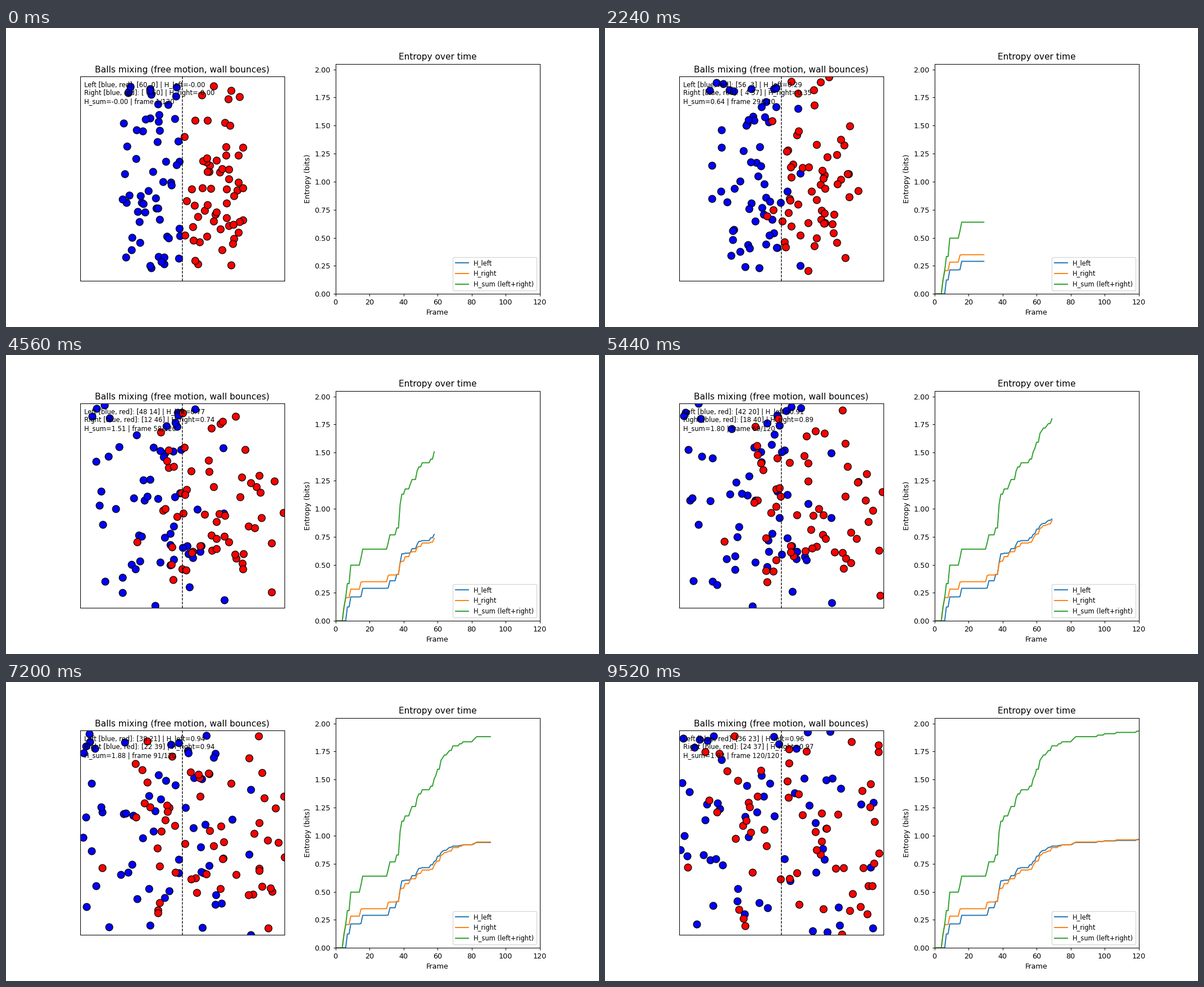
Write a matplotlib script that moves like this. It is 1054 px wide and 531 px high and loops after 9.6 s.

```python
import numpy as np
import matplotlib.pyplot as plt
from matplotlib.animation import FuncAnimation

plt.rcParams["font.family"] = "DejaVu Sans"

FRAMES, INTERVAL, DPI = 120, 80, 92
BALLS = 60
LEFT, RIGHT, TOP, BOTTOM = 132, 495, 87, 450
MID = (LEFT + RIGHT) / 2

# Frame numbers at which one more ball of the colour passes the middle.
BLUE_CROSS = [5, 6, 9, 15, 31, 38, 38, 41, 44, 48, 51, 58, 59, 62, 62, 64,
              69, 69, 73, 75, 81, 83, 100, 107]
RED_CROSS = [7, 9, 16, 32, 36, 38, 38, 39, 39, 45, 48, 49, 56, 58, 60, 60,
             62, 63, 66, 67, 82, 96, 119]

rng = np.random.default_rng(7)


def launch(crossings, toward):
    """Random starts and velocities; some balls pass the middle on schedule."""
    time = np.array(crossings) - 1.5
    crossing = slice(len(time))
    gap = rng.uniform(4, 108, BALLS)
    gap[crossing] = np.minimum(108, 1.9 * time) * rng.uniform(0.3, 1, len(time))
    speed = rng.uniform(-1.7, gap / 125)
    speed[crossing] = gap[crossing] / time
    start = np.column_stack([MID - toward * gap, rng.uniform(98, 436, BALLS)])
    vy = np.clip(rng.normal(0, 0.9, BALLS), -1.9, 1.9)
    return start, np.column_stack([toward * speed, vy])


def bounce(value, low, high):
    span = high - low
    return low + span - np.abs((value - low) % (2 * span) - span)


def positions(start, velocity, step):
    x, y = (start + velocity * step).T
    return np.column_stack([bounce(x, LEFT, RIGHT), bounce(y, TOP, BOTTOM)])


def entropy(counts):
    p = counts / counts.sum()
    p = p[p > 0]
    return -np.sum(p * np.log2(p))


numbers = np.arange(1, FRAMES + 1)
blue_over = np.searchsorted(BLUE_CROSS, numbers, side="right")
red_over = np.searchsorted(RED_CROSS, numbers, side="right")
left_counts = np.column_stack([BALLS - blue_over, red_over])
right_counts = np.column_stack([blue_over, BALLS - red_over])
h_left = np.array([entropy(c) for c in left_counts])
h_right = np.array([entropy(c) for c in right_counts])
h_sum = h_left + h_right

fig, (box, graph) = plt.subplots(1, 2, figsize=(11.457, 5.772), dpi=DPI)
fig.subplots_adjust(left=0.125, right=0.9, bottom=0.1108, top=0.88, wspace=0.25)

box.set(xlim=(LEFT, RIGHT), ylim=(BOTTOM, TOP), xticks=[], yticks=[],
        aspect="equal", title="Balls mixing (free motion, wall bounces)")
box.axvline(MID, color="black", linestyle="--", linewidth=1)
info = box.text(0.02, 0.98, "", transform=box.transAxes, va="top", fontsize=9)

balls = []
for crossings, toward, color in [(BLUE_CROSS, 1, "blue"), (RED_CROSS, -1, "red")]:
    start, velocity = launch(crossings, toward)
    dots = box.scatter(*start.T, s=100, c=color, edgecolors="black", linewidths=1)
    balls.append((dots, start, velocity))

graph.set(xlim=(0, FRAMES), ylim=(0, 2.05), xlabel="Frame",
          ylabel="Entropy (bits)", title="Entropy over time")
graph.set_yticks(np.arange(0, 2.01, 0.25))
curves = [(graph.plot([], [], label=label)[0], values) for label, values in [
    ("H_left", h_left), ("H_right", h_right), ("H_sum (left+right)", h_sum)]]
graph.legend(loc="lower right", fontsize=9)


def update(i):
    for dots, start, velocity in balls:
        dots.set_offsets(positions(start, velocity, i))
    for line, values in curves:
        line.set_data(numbers[:i + 1], values[:i + 1])
    info.set_text(
        f"Left [blue, red]: {left_counts[i]} | H_left={h_left[i]:.2f}\n"
        f"Right [blue, red]: {right_counts[i]} | H_right={h_right[i]:.2f}\n"
        f"H_sum={h_sum[i]:.2f} | frame {i + 1}/{FRAMES}")
    return [info]


anim = FuncAnimation(fig, update, frames=FRAMES, interval=INTERVAL,
                     repeat=True, repeat_delay=0)
plt.show()
```
